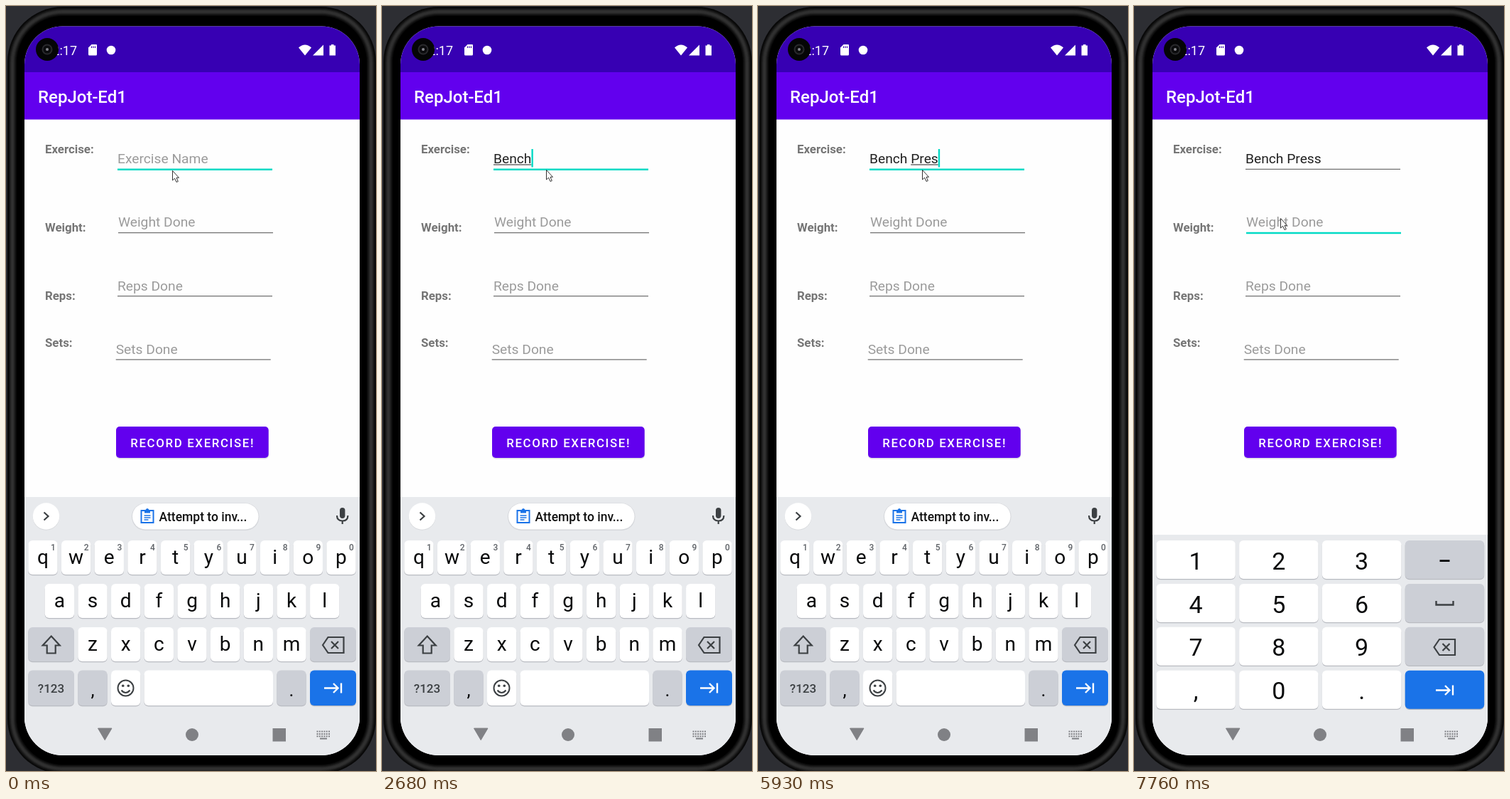
Animation, 521 px wide and 1075 px high, one loop 8000 ms. Source, as an HTML page with a canvas:

```html
<!DOCTYPE html>
<html lang="en">
<head>
<meta charset="utf-8">
<title>Workout form</title>
<style>
html, body { margin: 0; width: 521px; height: 1075px; overflow: hidden; background: #2d2e33; }
canvas { display: block; }
</style>
</head>
<body>
<canvas id="stage" width="521" height="1075"></canvas>
<script>
const ctx = document.getElementById('stage').getContext('2d');
const LOOP = 8000;
const TEAL = '#03dac5', INK = '#08090a', GREY = '#5f6368', BLUE = '#1a73e8', FN_KEY = '#cccfd6', HINT = '#9b9b9b';
const BODY = 19.23;

// [time, text, underline start, underline end]
const edits = [
  [0, '', 0, 0], [540, 'B', 0, 0], [800, 'Be', 0, 1], [970, 'Ben', 0, 2],
  [1120, 'Benc', 0, 3], [1250, 'Bench', 0, 4], [1370, 'Bench', 0, 5],
  [3760, 'Bench ', 0, 5], [4070, 'Bench ', 0, 0], [4220, 'Bench P', 6, 6],
  [4340, 'Bench Pr', 6, 7], [4490, 'Bench Pre', 6, 8], [4610, 'Bench Pres', 6, 9],
  [4890, 'Bench Presss', 6, 11], [5140, 'Bench Presss', 6, 12],
  [5810, 'Bench Press', 6, 11], [5930, 'Bench Pres', 6, 10],
  [6050, 'Bench Press', 6, 10], [6200, 'Bench Press', 6, 11], [7200, 'Bench Press', 0, 0]
];
const caret = [[0, 0], [290, 1], [1910, 0], [2440, 1], [2960, 0], [3360, 1],
  [5540, 0], [5810, 1], [6750, 0], [7060, 1], [7760, 0]];
const pointer = [[0, 234, 231], [2560, 232, 230.5], [2680, 231, 230],
  [6600, 231, 265], [6750, 208, 285.5], [6890, 206, 298]];
const FOCUS_WEIGHT = 7060, NUMBER_PAD = 7200;

const at = (list, t) => list.findLast(e => e[0] <= t);

function box(x, y, w, h, r, fill) {
  ctx.fillStyle = fill;
  ctx.beginPath();
  ctx.roundRect(x, y, w, h, r);
  ctx.fill();
}

function disc(x, y, r, fill) {
  box(x - r, y - r, 2 * r, 2 * r, r, fill);
}

function text(str, x, y, size, fill, weight = 400, align = 'left', spacing = 0) {
  ctx.font = `${weight} ${size}px Roboto, sans-serif`;
  ctx.letterSpacing = spacing + 'px';
  ctx.textAlign = align;
  ctx.fillStyle = fill;
  ctx.fillText(str, x, y);
}

function textWidth(str) {
  ctx.font = `400 ${BODY}px Roboto, sans-serif`;
  ctx.letterSpacing = '0px';
  return ctx.measureText(str).width;
}

function shape(d, x, y, fill, stroke, width = 2) {
  const path = new Path2D(d);
  ctx.save();
  ctx.translate(x, y);
  if (fill) { ctx.fillStyle = fill; ctx.fill(path); }
  if (stroke) { ctx.strokeStyle = stroke; ctx.lineWidth = width; ctx.stroke(path); }
  ctx.restore();
}

// The metal rim brightens towards its middle, then falls off to the black bezel.
function phone() {
  ctx.fillStyle = '#2d2e33';
  ctx.fillRect(0, 0, 521, 1075);
  for (let inset = 0; inset <= 13; inset++) {
    const light = 8 + 42 * Math.sin(Math.PI * inset / 13) ** 2;
    const color = inset < 13 ? `rgb(${light} ${light} ${light})` : '#000';
    box(2 + inset, 1 + inset, 519 - 2 * inset, 1078 - 2 * inset, 78 - inset, color);
  }
}

function header() {
  box(26, 28, 472, 65, 0, '#3700b3');
  box(26, 93, 472, 66.5, 0, '#6200ee');
  text('RepJot-Ed1', 45, 135.5, 24.04, '#fff', 500);
  text('2:17', 100, 69, 18, '#fff', 400, 'right');
  disc(58, 61, 16, '#050506');
  disc(58, 61, 7.5, '#29292c');
  disc(58, 61, 5.5, '#0b0b0d');
  disc(58, 61, 2, '#85858c');
  shape('M4.5 0H11Q12 0 12 1V14Q12 15.500 10.500 15.500H1.500Q0 15.500 0 14V4.500Z', 116, 54, '#fff');
  shape('M4.500 2.500V5M7 2.500V5M9.500 2.500V5', 116, 54, null, '#3700b3', 1.2);
  disc(148, 62, 6.3, '#fff');
  shape('M0 4Q9 -4 18 4L9 15Z', 412, 54.5, '#fff');
  shape('M15 0V15H0Z', 432, 54.5, '#fff');
  shape('M2.500 0H6V1.500H8.500V15.500H0V1.500H2.500Z', 455.5, 54, '#fff');
}

function line(x, y, focused) {
  if (focused) box(x, y - .8, 218, 2.6, 0, TEAL);
  else box(x, y - .5, 218, 1.2, 0, '#707070');
}

function form(t) {
  const labels = [['Exercise:', 207], ['Weight:', 317], ['Reps:', 412.5], ['Sets:', 479]];
  for (const [label, y] of labels) text(label, 55, y, 16.83, '#757575', 700);

  const [, typed, from, to] = at(edits, t);
  const onWeight = t >= FOCUS_WEIGHT;
  text(typed || 'Exercise Name', 157, 221, BODY, typed ? '#212121' : HINT);
  if (to > from) {
    const start = textWidth(typed.slice(0, from));
    box(157 + start, 222.4, textWidth(typed.slice(0, to)) - start, 1.2, 0, '#212121');
  }
  line(157, 229.2, t < NUMBER_PAD);

  const pressed = onWeight && t < NUMBER_PAD;
  text('Weight Done', 158, 310, BODY, pressed ? '#686868' : HINT);
  line(158, 318.5, onWeight);
  text('Reps Done', 157, 399.5, BODY, HINT);
  line(157, 407.6, false);
  text('Sets Done', 154.7, 488.8, BODY, HINT);
  line(154.7, 496.8, false);

  if (at(caret, t)[1]) {
    if (onWeight) box(158, 290, 2.4, 25.5, 0, TEAL);
    else box(157 + textWidth(typed), 201, 2.4, 25.5, 0, TEAL);
  }

  box(155, 592.5, 215, 44, 5, '#dedee2');
  box(155, 591, 214.7, 44, 5, '#6200ee');
  text('RECORD EXERCISE!', 175.3, 620, 16.83, '#fff', 500, 'left', 1.65);
}

function key(x, y, w, h, fill, label, size, baseline, weight) {
  box(x, y + 1.3, w, h, 6, '#b9bbc1');
  box(x, y, w, h, 6, fill);
  if (label) text(label, x + w / 2, y + baseline, size, INK, weight, 'center');
}

const backspace = (x, y) =>
  shape('M-15 0L-7.500 -11H14.500V11H-7.500ZM-3 -5L7 5M7 -5L-3 5', x, y, null, '#3c4043', 2.2);
const nextArrow = (x, y) =>
  shape('M-13 0H6M0 -6.500L6.500 0L0 6.500M11 -7V7', x, y, null, '#fff', 2.4);

function suggestions() {
  disc(56.5, 718, 18.8, '#d8dadd');
  disc(56.5, 717, 18.7, '#fff');
  shape('M53.500 711.500L59.500 717L53.500 722.500', 0, 0, null, '#3c4043', 2.2);
  box(177, 698.5, 179.5, 38.5, 19.2, '#d5d7db');
  box(178, 699, 177.5, 36.5, 18.2, '#fff');
  shape('M0 2H17V19H0Z', 190.5, 707, null, BLUE);
  shape('M4.500 1H6Q8.500 -3 11 1H12.500V5.500H4.500Z', 190.5, 707, BLUE);
  shape('M4 9H13M4 12H13M4 15H10', 190.5, 707, null, BLUE, 1.7);
  text('Attempt to inv...', 215.5, 724, 17.5, '#111', 500);
  box(470, 705, 7.4, 15, 3.7, '#3c4043');
  shape('M466 716Q466 723.500 473.700 723.500T481.400 716M473.700 723.500V728', 0, 0, null, '#3c4043', 2.2);
}

function letterKeyboard() {
  const step = 46.67, w = 41.3, h = 48;
  box(26, 690, 472, 320, 0, '#e8eaed');
  suggestions();
  const row = (letters, x0, y) => [...letters].forEach((c, i) =>
    key(x0 + i * step, y, w, h, '#fff', c, 28, 33));
  row('qwertyuiop', 31.3, 751);
  row('asdfghjkl', 54.7, 812);
  row('zxcvbnm', 101.3, 873);
  [...'1234567890'].forEach((c, i) => text(c, 66.5 + i * step, 764.5, 12, GREY, 500, 'center'));

  key(31.3, 873, 64.6, h, FN_KEY);
  shape('M0 -12L12 1H6V12H-6V1H-12Z', 63.7, 897.5, null, '#3c4043', 2.2);
  key(428, 873, 65, h, FN_KEY);
  backspace(461, 898);

  key(31.3, 933.5, 64.6, 49.5, FN_KEY);
  text('?123', 63.5, 965, 17, '#3c4043', 500, 'center');
  key(101.3, 933.5, w, 49.5, FN_KEY, ',', 26, 36.5);
  key(148, 933.5, w, 49.5, '#fff');
  shape('M11 0A11 11 0 1 1 -11 0A11 11 0 1 1 11 0M-6 3Q0 10 6 3', 168.5, 958.5, null, '#3c4043', 2);
  disc(164.7, 955.3, 1.8, '#3c4043');
  disc(172.3, 955.3, 1.8, '#3c4043');
  key(194.5, 933.5, 181.5, 49.5, '#fff');
  key(381.3, 933.5, w, 49.5, FN_KEY, '.', 26, 36.5);
  key(428, 933.5, 65, 49.5, BLUE);
  nextArrow(461, 958.5);
}

function numberPad() {
  box(26, 743, 472, 270, 0, '#e8eaed');
  ['123', '456', '789', ',0.'].forEach((digits, r) => {
    const y = 751 + r * 60.9;
    [...digits].forEach((c, i) => key(31.3 + i * 116.8, y, 111.5, 54, '#fff', c, 34, 40.6));
    key(381.7, y, 111.5, 54, r === 3 ? BLUE : FN_KEY);
  });
  box(430.5, 778.3, 14, 2.6, 0, INK);
  shape('M425.500 836V841.500H449.500V836', 0, 0, null, '#3c4043', 2.4);
  backspace(437.5, 901);
  nextArrow(438, 961.5);
}

function navigation() {
  const color = '#808185';
  shape('M129.500 1015H149L139.200 1031.500Z', 0, 0, color, color, 1);
  disc(262, 1024, 9, color);
  box(375.5, 1015, 18.5, 18.5, 0, color);
  for (let r = 0; r < 3; r++)
    for (let i = 0; i < 6; i++) box(437.5 + i * 3.3, 1018.5 + r * 3.4, 2, 2, 0, color);
  box(442, 1028.5, 10, 2, 0, color);
}

function draw(t) {
  phone();
  ctx.save();
  ctx.beginPath();
  ctx.roundRect(26, 28.5, 472, 1024.5, 54);
  ctx.clip();
  box(26, 28, 472, 1026, 0, '#fefefe');
  header();
  form(t);
  box(26, 1000, 472, 54, 0, '#e8eaed');
  t < NUMBER_PAD ? letterKeyboard() : numberPad();
  navigation();
  ctx.restore();
  const [, x, y] = at(pointer, t);
  shape('M.5 .5V14L3.600 11.200L6 16.500L8.300 15.500L6 10.300H9.500Z', x, y, '#fff', '#333', 1);
}

const start = performance.now();
function frame() {
  draw((performance.now() - start) % LOOP);
  requestAnimationFrame(frame);
}
frame();
</script>
</body>
</html>
```
